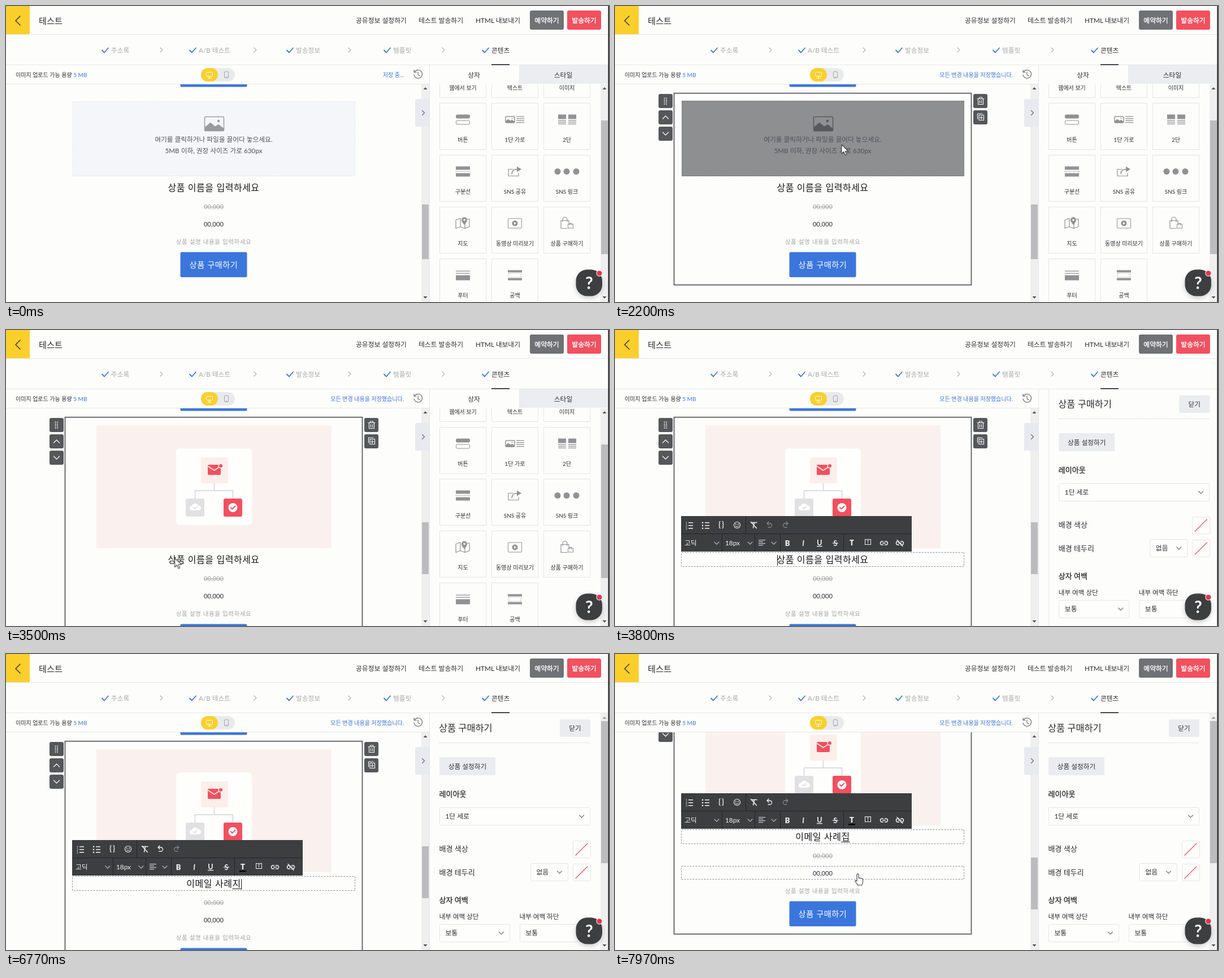
Write an HTML page that moves like this. It is 1067 px wide and 525 px high and loops after 8 s.

```html
<!DOCTYPE html>
<html lang="ko">
<head>
<meta charset="utf-8">
<title>콘텐츠 편집</title>
<style>
html, body { margin: 0; width: 100%; height: 100%; overflow: hidden; background: #fdfdfb; }
svg { display: block; width: 1067px; height: 525px; }
text { font-family: Lato, "Noto Sans CJK KR", "Noto Sans CJK", sans-serif; fill: #2b2c30; white-space: pre; }
.mid { text-anchor: middle; }
.end { text-anchor: end; }
.head { stroke: #2b2c30; stroke-width: .35px; }
.pale { stroke: #fff; stroke-width: .35px; }
.wide { letter-spacing: 2px; font-weight: 700; }
.ed { font-family: "Noto Sans CJK KR", "Noto Sans CJK", sans-serif; letter-spacing: .5px; }
.ln { fill: none; stroke-linecap: round; stroke-linejoin: round; }

/* one loop is 8 s, so 1% = 80 ms */
.saving, .saved, .sel, .frame, .thumb, .empty, .hover, .photo, .low, .tools, .ink, .undo, .price,
.done::before, .comp::before, .c1, .c2, .arrow, .hand { animation: 8s step-end infinite; }
.saving { animation-name: saving; }
.saved { animation-name: saved; }
.sel { animation-name: sel; }
.frame { animation-name: frame; }
.thumb { animation-name: thumb; }
.empty { animation-name: empty; }
.hover { animation-name: hover; }
.photo { animation-name: photo; }
.low { animation-name: low; }
.tools { animation-name: tools; }
.ink { animation-name: ink; }
.undo { animation-name: undo; }
.price { animation-name: price; }
.arrow { animation-name: arrow; }
.hand { animation-name: hand; }
.c1 { animation-name: caretStart; }
.c2 { animation-name: caretEnd; }
.scroll { animation: scroll 8s linear infinite; }
.bar { animation: bar 8s linear infinite; }
.panel { animation: slide 8s linear infinite; }
.move { animation: move 8s linear infinite; }

@keyframes saving { 0% { opacity: 1 } 10% { opacity: 0 } 31.5% { opacity: 1 } 42.5%, 100% { opacity: 0 } }
@keyframes saved { 0% { opacity: 0 } 10% { opacity: 1 } 31.5% { opacity: 0 } 42.5%, 100% { opacity: 1 } }
@keyframes sel { 0% { opacity: 0 } 16.5%, 100% { opacity: 1 } }
@keyframes frame { 0% { height: 340px } 31.5%, 100% { height: 425px } }
@keyframes thumb { 0% { y: 352px; height: 97px } 31.5%, 100% { y: 341px; height: 92px } }
@keyframes empty { 0% { opacity: 1 } 31.5%, 100% { opacity: 0 } }
@keyframes hover { 0% { opacity: 0 } 16.5% { opacity: 1 } 31.5%, 100% { opacity: 0 } }
@keyframes photo { 0% { opacity: 0 } 31.5%, 100% { opacity: 1 } }
@keyframes low { 0% { transform: none } 31.5%, 100% { transform: translateY(85px) } }
@keyframes tools { 0% { opacity: 0 } 45%, 100% { opacity: 1 } }
@keyframes ink { 0% { opacity: 0 } 48.75%, 100% { opacity: 1 } }
@keyframes undo { 0% { opacity: .4 } 65%, 100% { opacity: 1 } }
@keyframes price { 0% { opacity: 0 } 96.25%, 100% { opacity: 1 } }
@keyframes slide {
  0% { transform: translateX(322px) }
  45% { transform: translateX(322px); animation-timing-function: cubic-bezier(.215, .61, .355, 1) }
  48.95%, 100% { transform: none }
}
@keyframes scroll {
  0% { transform: none }
  93.6% { transform: none; animation-timing-function: ease-out }
  95.8%, 100% { transform: translateY(-83px) }
}
@keyframes bar {
  0% { transform: none }
  93.6% { transform: none; animation-timing-function: ease-out }
  95.8%, 100% { transform: translateY(20px) }
}
@keyframes arrow { 0% { opacity: 0 } 13% { opacity: 1 } 45%, 100% { opacity: 0 } }
@keyframes hand { 0% { opacity: 0 } 96.25%, 100% { opacity: 1 } }
@keyframes move {
  0%, 13% { transform: translate(560px, 300px); animation-timing-function: ease-out }
  18%, 32% { transform: translate(401px, 246px); animation-timing-function: ease-in-out }
  35.8%, 40% { transform: translate(449px, 394px); animation-timing-function: ease-in-out }
  44.5%, 100% { transform: translate(290px, 405px) }
}

.title { font: 16px/26px "Noto Sans CJK KR", "Noto Sans CJK", sans-serif; letter-spacing: .5px; color: #17181b; text-align: center; white-space: pre; }
.title i { display: inline-block; width: 0; height: 19px; vertical-align: middle; border-left: 1.5px solid #111; margin-right: -1.5px; }
.comp { text-decoration: underline 1px; text-underline-offset: 3px; }
.done::before { content: ""; animation-name: done; }
.comp::before { content: ""; animation-name: comp; }
@keyframes done {
  0% { content: "상품 이름을 입력하세요" } 63% { content: "" } 67.8% { content: "이" } 71% { content: "이메" }
  74.2% { content: "이메일 " } 80.6% { content: "이메일 사" } 83.8%, 100% { content: "이메일 사례" }
}
@keyframes comp {
  0% { content: "" } 63% { content: "ㅇ" } 64.6% { content: "이" } 66.2% { content: "임" } 67.8% { content: "메" }
  69.4% { content: "멩" } 71% { content: "이" } 72.6% { content: "일" } 74.2% { content: "" } 75.8% { content: "ㅅ" }
  77.4% { content: "사" } 79% { content: "살" } 80.6% { content: "례" } 82.2% { content: "롖" }
  83.8% { content: "지" } 85.4%, 100% { content: "집" }
}
@keyframes caretStart { 0% { opacity: 0 } 45% { opacity: 1 } 51.6% { opacity: 0 } 58.2% { opacity: 1 } 63%, 100% { opacity: 0 } }
@keyframes caretEnd { 0% { opacity: 0 } 63% { opacity: 1 } 92%, 100% { opacity: 0 } }
</style>
</head>
<body>
<script>
const GRAY = '#929296', BLUE = '#3b76dd', RED = '#f2505f', DARK = '#3c3e40', EDGE = '#e5e6e9', BTN = '#ebecf0';

// y is the vertical centre of the text
const text = (x, y, s, size = 11.8, cls = '', fill = '') =>
  `<text x="${x}" y="${y + size * .36}" font-size="${size}" class="${cls}"${fill && ` style="fill:${fill}"`}>${s}</text>`;
const rect = (x, y, w, h, fill, r = 0, more = '') =>
  `<rect x="${x}" y="${y}" width="${w}" height="${h}" rx="${r}" fill="${fill}" ${more}/>`;
const box = (x, y, w, h, stroke, r = 0, more = '') =>
  rect(x + .5, y + .5, w - 1, h - 1, 'none', r, `stroke="${stroke}" ${more}`);
const line = (d, stroke, w = 1.2, more = '') => `<path class="ln" d="${d}" stroke="${stroke}" stroke-width="${w}" ${more}/>`;
const dot = (x, y, r, fill, more = '') => `<circle cx="${x}" cy="${y}" r="${r}" fill="${fill}" ${more}/>`;
const shape = (d, fill, more = '') => `<path d="${d}" fill="${fill}" ${more}/>`;
const at = (x, y, s, cls = '') => `<g transform="translate(${x} ${y})"><g class="${cls}">${s}</g></g>`;
const group = (cls, ...s) => `<g class="${cls}">${s.join('')}</g>`;
const right = (x, y, c, n = 4) => line(`M${x - n / 2} ${y - n}l${n} ${n}l${-n} ${n}`, c);
const down = (x, y, c, n = 4) => line(`M${x - n} ${y - n / 2}l${n} ${n}l${n} ${-n}`, c);
const up = (x, y, c, n = 4) => line(`M${x - n} ${y + n / 2}l${n} ${-n}l${n} ${n}`, c);
const tri = (x, y, s, c = '#555') => shape(`M${x - 3.5} ${y + 2 * s}h7l-3.5 ${-4 * s}z`, c);
const rows = (x, y, w, n, c, gap = 3, thick = 1.3) =>
  Array.from({ length: n }, (_, i) => rect(x, y + i * gap, w, thick, c)).join('');
const picture = (w, h, c) =>
  rect(-w / 2, -h / 2, w, h, 'none', 1.5, `stroke="${c}" stroke-width="1.5"`) +
  shape(`M${-w / 2} ${h / 2}v${-h * .25}l${w * .3} ${-h * .35}l${w * .25} ${h * .28}l${w * .17} ${-h * .15}l${w * .28} ${h * .3}v${h * .17}z`, c) +
  dot(w * .22, -h * .2, h * .09, c);

function header() {
  const steps = [['주소록', 169], ['A/B 테스트', 324], ['발송정보', 496], ['템플릿', 668], ['콘텐츠', 842]];
  return rect(0, 0, 42, 50, '#fbcf2b') + line('M25 18l-8 8l8 8', '#3a3320', 1.5) +
    text(58, 27, '테스트', 15.2) +
    text(619, 26, '공유정보 설정하기') + text(730, 26, '테스트 발송하기') + text(831, 26, 'HTML 내보내기') +
    rect(927, 8, 60, 34, '#6f7175', 3) + text(957, 26, '예약하기', 11.8, 'mid pale', '#fff') +
    rect(993, 8, 60, 34, RED, 3) + text(1023, 26, '발송하기', 11.8, 'mid pale', '#fff') +
    rect(0, 50, 1067, 1, EDGE) + rect(0, 104, 1067, 1, EDGE) +
    steps.map(([s, x], i) => line(`M${x + 1} 78.5l4 4l7 -8`, BLUE, 1.8) +
      text(x + 17, 79, s, 11.7, '', i < 4 ? '#a9aaa8' : '')).join('') +
    [275, 441, 608, 774].map(x => right(x, 78, '#b4b5b3')).join('') +
    rect(859, 103, 32, 2, '#45464d');
}

function subbar() {
  return rect(0, 138, 749, 1, EDGE) +
    text(17, 122, `이미지 업로드 가능 용량 <tspan style="fill:${BLUE}">5 MB</tspan>`, 10) +
    rect(345, 110, 60, 24, '#e9eaec', 12) + rect(345, 110, 30, 24, '#fbd02c', 12) +
    box(354, 117, 12, 8, '#fff', 1) + line('M360 125v2.5M357 128h6', '#fff') +
    box(386, 116, 8, 12, '#a5a6aa', 1.5) + line('M389 126h2', '#a5a6aa', 1) +
    text(704, 122, '저장 중...', 10, 'end saving', BLUE) +
    text(704, 122, '모든 변경 내용을 저장했습니다.', 10, 'end saved', BLUE) +
    line('M723 117a7.3 7.3 0 1 1 -1 5M722 113.5v4h4M729 117v5l3.5 2', '#707176', 1.2);
}

function emptyPhoto() {
  const words = c => at(368.5, 209, picture(34, 25, c)) +
    text(367.5, 237, '여기를 클릭하거나 파일을 끌어다 놓으세요.', 11.7, 'mid', '#505156') +
    text(367.5, 257, '5MB 이하, 권장 사이즈 가로 630px', 11.7, 'mid', '#505156');
  const dash = 'stroke-dasharray="2 2"';
  return group('empty', rect(118, 169, 500, 133, '#f5f6fa'), box(118, 169, 500, 133, '#e2e3ea', 0, dash), words('#9a9b9e')) +
    group('hover', rect(118, 168, 500, 134, '#8e8f90'), box(118, 168, 500, 134, '#707173', 0, dash), words('#58595c'));
}

function photo() {
  return group('photo', rect(160, 169, 416, 218, '#faf1ee'), rect(301, 210, 134, 136, '#fefefd', 6),
    rect(345, 226, 48, 46, '#fbeeeb', 3),
    rect(357, 239, 23, 18, RED, 2), line('M358 242l10.5 7l10.5 -7', '#fbeeeb', 1.6),
    dot(380, 241, 4.5, '#fbeeeb'), dot(380, 241, 3, RED),
    line('M368.5 272v13M334.5 299v-14h67v14', '#d3d3dc', 1.4),
    rect(318, 299, 33, 32, '#e1e1e3', 3), rect(385, 299, 33, 32, RED, 3),
    shape('M329 320a4 4 0 0 1 0 -8a6 6 0 0 1 11 -1a4.5 4.5 0 0 1 1 9z', '#fff'),
    line('M332 315l2 2l4 -4', '#d6d6d8', 1.4),
    dot(401.5, 315, 8, '#fff'), line('M398 315l2.5 2.5l5 -5', RED, 1.8));
}

function selection() {
  const sq = (x, y) => rect(x, y, 25, 25, '#55575b', 3);
  const grip = [0, 1, 2, 3].map(i => dot(87.5, 163.5 + i * 3.4, 1, '#fff') + dot(91, 163.5 + i * 3.4, 1, '#fff')).join('');
  return group('sel', rect(104.5, 154.7, 526, 340, 'none', 0, 'class="frame" stroke="#55575c" stroke-width="1.7"'),
    sq(77, 156), sq(77, 185), sq(77, 214), sq(634, 156), sq(634, 185), grip,
    up(89.5, 197.5, '#fff', 5), down(89.5, 226.5, '#fff', 5),
    line('M641 164.5h12M644.5 164v-2h5v2M642.5 165v9.5h9v-9.5M645.5 167.5v4.5M648.5 167.5v4.5', '#fff', 1.1),
    line('M644 193.5h8.5v9h-8.5zM641.5 191v9M641.5 191h8.5M648.2 195.5v5M645.7 198h5', '#fff', 1.1));
}

// text toolbar, 408 x 63 at its own origin
function toolbar() {
  const w = '#f4f4f4', dim = '#84858a';
  const list = x => rows(x + 5, 11, 8, 3, w, 5, 1.5);
  const rule = (x, y) => rect(x, y, 1, 31, '#242528');
  const turn = 'M-4 -3h5a3.5 3.5 0 0 1 0 7h-3M-4 -3l3 -3M-4 -3l3 3';
  return rect(0, 0, 408, 63, DARK) + rect(0, 31, 408, 1, '#242528') +
    list(8) + ['1', '2', '3'].map((n, i) => text(8, 11.7 + i * 5, n, 5, '', w)).join('') +
    list(37) + [0, 1, 2].map(i => dot(38, 11.7 + i * 5, 1.3, w)).join('') +
    text(72, 15.5, '{}', 12.5, 'mid wide', w) +
    dot(99, 16, 5.5, 'none', `stroke="${w}" stroke-width="1.2"`) + dot(97, 14.5, .9, w) + dot(101, 14.5, .9, w) + line('M96.5 17.5q2.5 3 5 0', w, 1.1) +
    rule(114, 0) + line('M124 11.5h10M129.5 11.5l-2 9.5M123.5 10.5l10 11', w, 1.5) +
    at(156, 16, line(turn, w, 1.3), 'undo') + `<g transform="translate(185 16) scale(-1 1)">${line(turn, dim, 1.3)}</g>` +
    text(6, 48, '고딕', 11.8, '', w) + down(63, 48, '#b4b5b8') + rule(72, 32) +
    text(78, 48, '18px', 11.8, '', w) + down(122, 48, '#b4b5b8') + rule(130, 32) +
    rows(137, 42, 12, 2, '#c6c7ca', 6) + rows(137, 45, 8, 2, '#c6c7ca', 6) + down(164, 48, '#b4b5b8') + rule(175, 32) +
    text(188, 48, 'B', 13, 'mid" font-weight="900', w) + text(216, 48, 'I', 13, 'mid" font-weight="700" font-style="italic', w) +
    text(245, 47, 'U', 12.5, 'mid" font-weight="700', w) + rect(240, 53, 10, 1.3, w) +
    text(273, 48, 'S', 12.5, 'mid" font-weight="700', w) + rect(268, 47.5, 10, 1.2, w) + rule(287, 32) +
    text(302, 47.5, 'T', 13, 'mid" font-weight="900', w) + rect(296, 54, 12, 2.5, '#050505', 0, 'class="ink"') +
    box(325, 41, 11, 10, w) + text(330.5, 46, 'T', 8, 'mid', w) +
    [359, 387].map((x, i) => line(`M${x - 1.5} 45h-2a3 3 0 0 0 0 6h2M${x + 1.5} 45h2a3 3 0 0 1 0 6h-2M${x - 2.5} 48h5`, w, 1.4) +
      (i ? line(`M${x - 5} 42.5l10 11`, w, 1.3) : '')).join('');
}

function productText() {
  const dash = 'stroke-dasharray="3 2"';
  return group('low',
    group('tools', at(117, 245, toolbar()), rect(117, 309, 501, 26, '#fdfdfb'), box(117, 309, 501, 26, '#8f90a2', 0, dash)),
    `<foreignObject x="117" y="308" width="501" height="27"><div class="title"><i class="c1"></i><span class="done"></span><span class="comp"></span><i class="c2"></i></div></foreignObject>`,
    text(367.5, 356, '00,000', 11.2, 'mid', '#a2a2a2'), rect(350, 356, 35, 1, '#a2a2a2'),
    text(367.5, 387, '00,000', 11.2, 'mid'),
    group('price', box(117, 374, 501, 24, '#8f90a2', 0, dash)),
    text(367.5, 418, '상품 설명 내용을 입력하세요', 10.6, 'mid ed', '#a6a6a6'),
    rect(308.5, 436.5, 118, 44.5, BLUE, 2.5), text(367.5, 459, '상품 구매하기', 14.2, 'mid ed', '#fff'));
}

function editor() {
  return `<clipPath id="view"><rect y="139" width="735" height="386"/></clipPath><g clip-path="url(#view)">` +
    group('scroll', rect(308.5, 100, 118, 43.4, BLUE, 2.5), emptyPhoto(), photo(), selection(), productText()) + '</g>' +
    rect(735, 139, 14, 386, '#efeff0') + tri(742, 146, 1) + tri(742, 517, -1) +
    group('bar', rect(736, 352, 12, 97, '#bcbcbe', 0, 'class="thumb"')) +
    rect(724, 165, 25, 49, '#e8eaf0', 2) + right(738.5, 189.5, '#6a6b70');
}

function palette() {
  const slab = (y, h) => rect(-12, y, 25, h, GRAY);
  const icons = {
    '웹에서 보기': '', '텍스트': '', '이미지': '',
    '버튼': rect(-12, -9, 25, 7, GRAY, 3) + box(-12, 1, 25, 8, GRAY, 2),
    '1단 가로': at(-8, 0, picture(16, 11, GRAY)) + rows(3, -6, 14, 4, GRAY, 3.5),
    '2단': rect(-15, -9, 14, 8, GRAY) + rect(3, -9, 14, 8, GRAY) + rows(-15, 1, 14, 3, GRAY) + rows(3, 1, 14, 3, GRAY),
    '구분선': slab(-9, 6) + line('M-12 0h25', GRAY, 1, 'stroke-dasharray="1 2"') + slab(3, 6),
    'SNS 공유': line('M-3 -4h-8v12h18v-5', GRAY) + line('M-5 4q1 -8 9 -8', GRAY, 1.6) + shape('M4 -9l8 5l-8 5z', GRAY),
    'SNS 링크': [-16, 0, 17].map(x => dot(x, 0, 5.5, GRAY)).join(''),
    '지도': line('M-12 -6l8 -3v15l-8 3zM-4 6l8 3v-8M4 9l8 -3v-14l-5 1.5', GRAY) + shape('M3 3q-5 -6 -5 -9a5 5 0 0 1 10 0q0 3 -5 9z', GRAY) + dot(3, -6, 1.8, '#fdfdfb'),
    '동영상 미리보기': box(-12, -9, 25, 18, GRAY, 1) + dot(.5, 0, 5, GRAY) + shape('M-1 -2.5l4 2.5l-4 2.5z', '#fff'),
    '상품 구매하기': line('M1 9h-11v-14h14v5M-7 -3v-4a4 4 0 0 1 8 0v4', GRAY) + box(2, 1, 10, 8, GRAY) + line('M5 3v-3h4v3', GRAY, 1),
    '푸터': rows(-12, -8, 25, 2, GRAY, 4) + slab(0, 9),
    '공백': slab(-9, 4) + box(-11, -4, 23, 8, GRAY, 0, 'stroke-dasharray="1 2"') + slab(5, 4)
  };
  const cards = Object.entries(icons).map(([name, icon], i) => {
    const x = 767 + i % 3 * 92, y = 80 + Math.floor(i / 3) * 92;
    return box(x, y, 83, 83, EDGE) + at(x + 41, y + 29.5, icon) + text(x + 41.5, y + 65.5, name, 10, 'mid');
  }).join('');
  return `<clipPath id="cards"><rect x="750" y="139" width="317" height="386"/></clipPath><g clip-path="url(#cards)">${cards}</g>` +
    rect(908, 105, 158, 33, '#ecedf0') + text(828, 122.5, '상자', 11.8, 'mid') + text(986, 122.5, '스타일', 11.8, 'mid') +
    rect(1052, 139, 14, 386, '#efeff0') + rect(1053, 203, 12, 237, '#bcbcbe') + tri(1059, 146, 1) + tri(1059, 517, -1) +
    rect(749, 105, 1, 420, EDGE);
}

function panel() {
  const pick = (x, y, w, s) => rect(x + .5, y + .5, w - 1, 31, '#fefefd', 2, `stroke="${EDGE}"`) +
    text(x + 10.5, y + 16, s) + down(x + w - 15.5, y + 16, '#77787d');
  const swatch = y => box(1003, y, 32, 31, EDGE, 2) + line(`M1008 ${y + 26}l21 -21`, '#ea5560', 1.3);
  return group('panel', rect(749, 105, 318, 420, '#fdfdfb'), rect(749, 105, 1, 420, EDGE),
    text(766, 131, '상품 구매하기', 16.4), rect(980, 116, 54, 31, BTN, 2), text(1007, 131.5, '닫기', 11.6, 'mid'),
    line('M767 157.5h267', '#d3d4d8', 1, 'stroke-dasharray="1 2"'),
    rect(767, 183, 99, 32, BTN, 2), text(816.5, 199.5, '상품 설정하기', 11.7, 'mid'),
    text(766.5, 248, '레이아웃', 13, 'head'), pick(767, 272, 267, '1단 세로'),
    text(766.5, 345.5, '배경 색상', 13), swatch(331),
    text(766.5, 387.5, '배경 테두리', 13), pick(928, 371, 67, '없음'), swatch(372),
    text(766.5, 436.5, '상자 여백', 13, 'head'),
    text(766.5, 466, '내부 여백 상단', 11.6), pick(767, 479, 125, '보통'),
    text(908.5, 466, '내부 여백 하단', 11.6), pick(909, 479, 125, '보통'),
    rect(1052, 105, 14, 420, '#efeff0'), rect(1053, 119, 12, 252, '#bcbcbe'), tri(1059, 113, 1, '#999'), tri(1059, 517, -1));
}

function help() {
  return `<filter id="soft" x="-50%" y="-50%" width="200%" height="200%"><feGaussianBlur stdDeviation="4"/></filter>` +
    rect(1008, 471, 47, 47, '#0003', 22, 'filter="url(#soft)"') + rect(1008.5, 467.5, 46.5, 47, DARK, 20) +
    text(1032, 491, '?', 30, 'mid" font-weight="700', '#fff') + dot(1050, 474, 5.6, '#fff') + dot(1050, 474, 4.6, '#e2364c');
}

function pointers() {
  const pen = 'stroke="#3c3c40" stroke-width="1.1" stroke-linejoin="round"';
  return group('arrow', group('move', shape('M0 0v16l3.8 -3.5l2.6 6l2.6 -1.1l-2.6 -5.9h5.3z', '#fff', pen))) +
    group('hand', shape('M428 391.5a1.6 1.6 0 0 1 3.2 0v6q1.5 -1 3 .3q1.4 -.8 2.5 .5q1.8 -.6 1.8 1.5v4q0 3 -2 6.2h-7q-1.5 -3 -4.5 -6.5q-.6 -2 1 -2l2 1.5z', '#fff', pen));
}

const edge = () => rect(1065.5, 0, 1.5, 525, '#161616');

document.body.innerHTML = `<svg viewBox="0 0 1067 525">${rect(0, 0, 1067, 525, '#fdfdfb')}${
  [header, subbar, editor, palette, panel, help, pointers, edge].map(draw => draw()).join('')}</svg>`;
</script>
</body>
</html>
```
